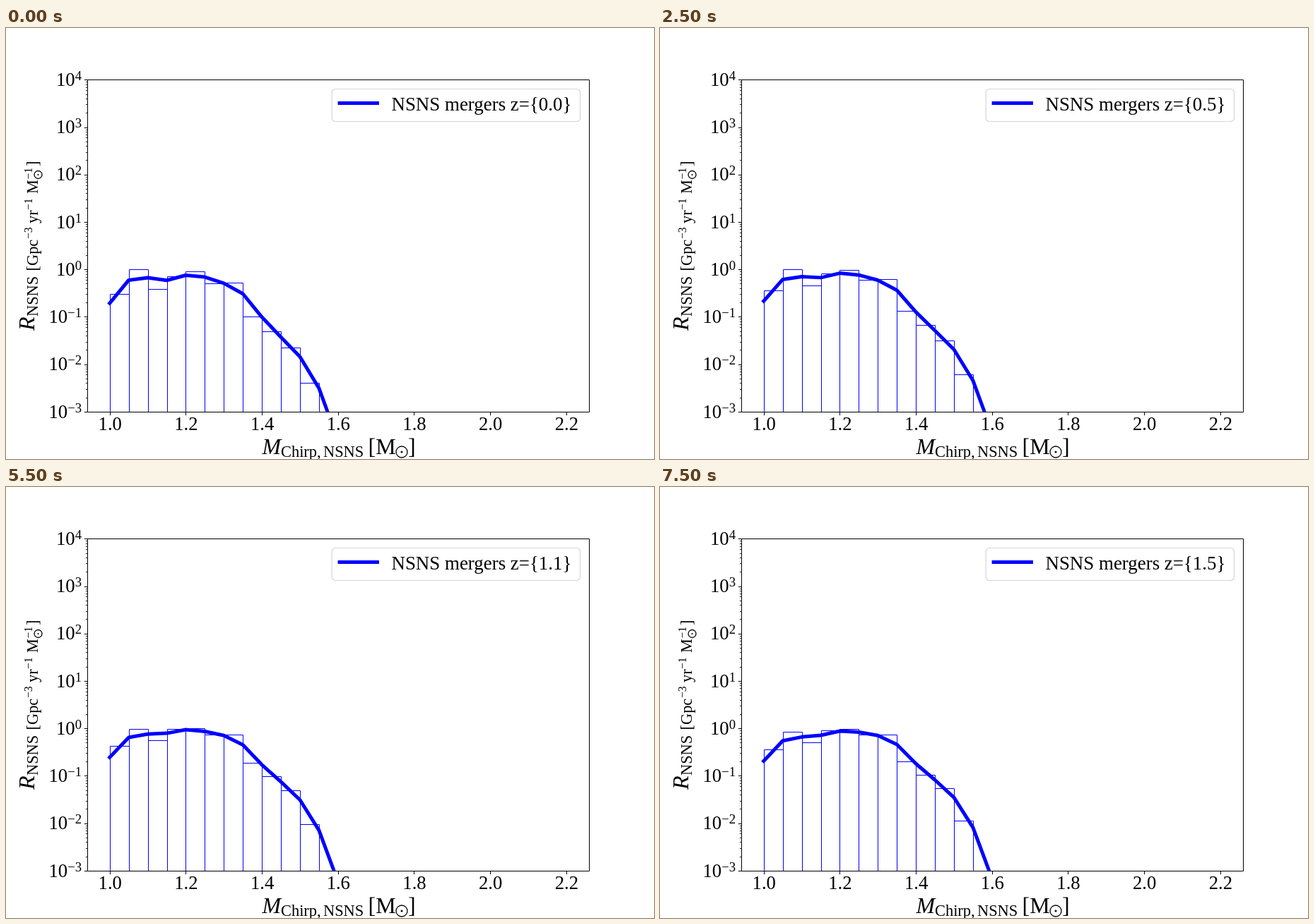
Animation of 917x611 px, one loop 8 s. Source, as an HTML page:

```html
<!DOCTYPE html>
<html lang="en">
<head>
<meta charset="utf-8">
<title>Merger rate by chirp mass</title>
<style>
  html, body { margin: 0; width: 100%; height: 100%; overflow: hidden; background: #fff; }
  svg { display: block; width: 917px; height: 611px; }
  text { font-family: "Liberation Serif", "Times New Roman", serif; font-size: 26.67px; white-space: pre; }
  #label { font-size: 26.9px; }
  .big { font-size: 32px; }
  .sub { font-size: 22.4px; }
  .sup { font-size: 18.67px; }
  .tiny { font-size: 15.7px; }
  .it { font-style: italic; }
  .axis { fill: none; stroke: #000; }
  .minor { stroke-width: .8; }
  .bars { fill: none; stroke: #00f; }
  .curve { fill: none; stroke: #00f; stroke-width: 5; stroke-linecap: square; stroke-linejoin: round; }
  .sun { fill: none; stroke: #000; stroke-width: 1.3; }
</style>
</head>
<body>
<svg viewBox="0 0 917 611">
  <clipPath id="plot"><rect x="114.6" y="73.3" width="710.7" height="470.5"/></clipPath>
  <g clip-path="url(#plot)">
    <path id="bars" class="bars"/>
    <path id="curve" class="curve"/>
  </g>
  <g id="axes"></g>

  <rect id="box" y="86.5" height="46" rx="5" fill="#fff" stroke="#d6d6d6" stroke-width="1.2"/>
  <path id="key" class="curve"/>
  <text id="label" y="116.5"></text>

  <g>
    <text class="big it" x="362.5" y="604">M</text>
    <text class="sub" x="389" y="608">Chirp,</text>
    <text class="sub" x="449" y="608">NSNS</text>
    <text class="big" x="512.5" y="604">[M</text>
    <circle class="sun" cx="560" cy="601" r="8"/><circle cx="560" cy="601" r="1.5"/>
    <text class="big" x="569" y="604">]</text>
  </g>
  <g transform="rotate(-90)">
    <text class="big it" x="-429" y="40">R</text>
    <text class="sub" x="-409" y="45">NSNS</text>
    <text class="sub" x="-344.5" y="45">[Gpc</text>
    <text class="tiny" x="-299" y="37">−3</text>
    <text class="sub" x="-277" y="45">yr</text>
    <text class="tiny" x="-258" y="37">−1</text>
    <text class="sub" x="-235" y="45">M</text>
    <text class="tiny" x="-214.5" y="37">−1</text>
    <circle class="sun" cx="-208" cy="45.5" r="5.5"/><circle cx="-208" cy="45.5" r="1.1"/>
    <text class="sub" x="-196" y="45">]</text>
  </g>
</svg>
<script>
const STEP = 500, COUNT = 16, PEAK = 11;
const X0 = 146.75, BIN = 26.92, TOP = 73.3, BOTTOM = 543.8, DECADE = (BOTTOM - TOP) / 7;
// Rate per mass bin at redshift 0 and at the peak.
const LOCAL = [0.3, 1, 0.38, 0.69, 0.9, 0.5, 0.52, 0.1, 0.048, 0.022, 0.004];
const HIGH = [0.42, 0.97, 0.56, 0.96, 1, 0.73, 0.72, 0.186, 0.095, 0.048, 0.0094];

const $ = id => document.getElementById(id);
const snap = v => Math.floor(v + 0.5) + 0.5;
const edge = i => X0 + BIN * i;
const level = rate => TOP + DECADE * (4 - Math.log10(rate));

// Rates grow evenly to the peak, then tilt slowly towards heavy bins.
function ratesAt(n) {
  const grown = Math.min(n / PEAK, 1), late = Math.max(n - PEAK, 0);
  return LOCAL.map((low, i) =>
    low * (HIGH[i] / low) ** grown * 10 ** (late * 0.0037 * (i - 5.5)));
}

// Rate at a bin edge: weighted mean of the four nearest bins.
function smooth(rates, i) {
  const bin = k => rates[k] || 0;
  return 0.438 * (bin(i - 1) + bin(i)) + 0.062 * (bin(i - 2) + bin(i + 1));
}

function drawAxes() {
  const left = snap(114.6);
  let major = `M${left} ${snap(TOP)}H${snap(825.3)}V${snap(BOTTOM)}H${left}Z`, minor = '', labels = '';
  for (let i = 0; i < 7; i++) {
    const x = edge(i * 4);
    major += `M${snap(x)} 544.5v4.67`;
    labels += `<text x="${x + 0.5}" y="570" text-anchor="middle">${(1 + i / 5).toFixed(1)}</text>`;
  }
  for (let p = -3; p <= 4; p++) {
    const y = level(10 ** p);
    major += `M${left} ${snap(y)}h-4.67`;
    for (let m = 2; m < 10 && p < 4; m++)
      minor += `M${left} ${snap(level(m * 10 ** p))}h-2.67`;
    labels += `<text x="107" y="${y + 8.7}" text-anchor="end">10<tspan class="sup" dy="-8">${String(p).replace('-', '−')}</tspan></text>`;
  }
  $('axes').innerHTML =
    `<path class="axis" d="${major}"/><path class="axis minor" d="${minor}"/>${labels}`;
}

function drawStep(n) {
  const rates = ratesAt(n);
  $('bars').setAttribute('d', rates.map((rate, i) =>
    `M${snap(edge(i))} 560V${snap(level(rate) - 0.5)}H${snap(edge(i + 1))}V560`).join(''));
  const points = Array.from({ length: rates.length + 2 }, (_, i) =>
    `${edge(i)} ${level(smooth(rates, i))}`);
  $('curve').setAttribute('d', 'M' + points.join('L'));

  const z = n * 0.1;
  const value = Number.isInteger(z) ? z.toFixed(1) : String(z);
  const x = 461.2 - 13.33 * (value.length - 3);
  $('box').setAttribute('x', x);
  $('box').setAttribute('width', 812.5 - x);
  $('key').setAttribute('d', `M${x + 10.9} 106.5h53.3`);
  $('label').setAttribute('x', x + 84.3);
  $('label').textContent = `NSNS mergers z={${value}}`;
}

let shown = -1;
const start = performance.now();
function tick() {
  const n = Math.floor((performance.now() - start) / STEP) % COUNT;
  if (n !== shown) drawStep(shown = n);
  requestAnimationFrame(tick);
}
drawAxes();
tick();
</script>
</body>
</html>
```
